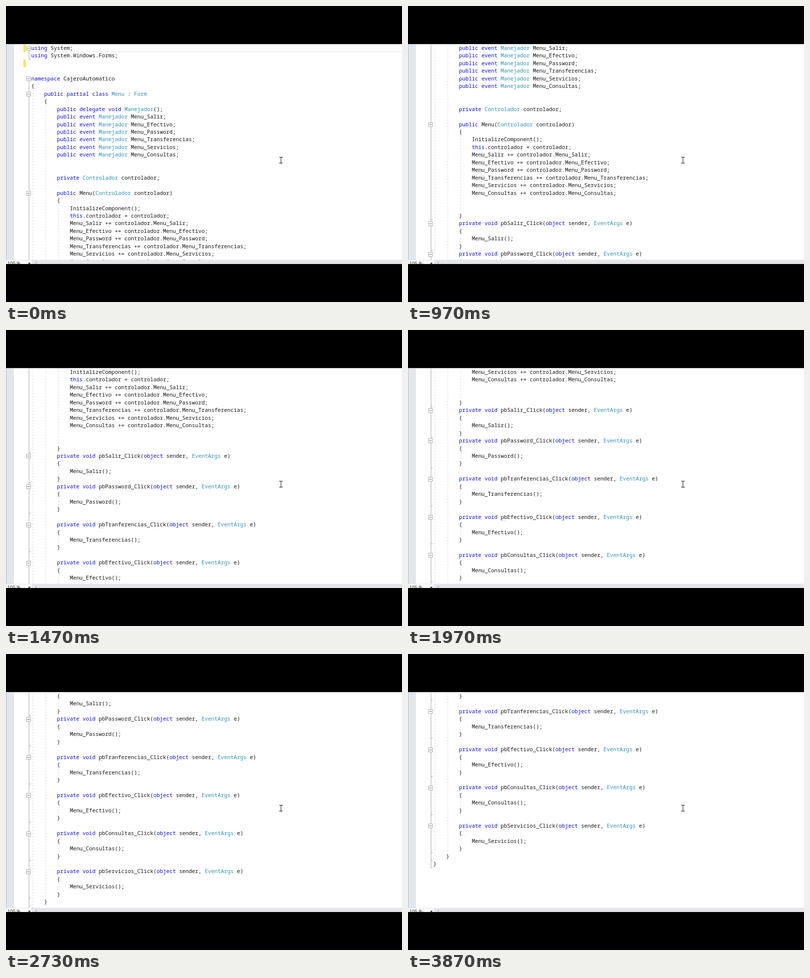
An HTML page with a canvas that plays this animation: 800 px wide and 600 px high, repeating every 3.91 s.

```html
<!DOCTYPE html>
<html lang="es">
<head>
<meta charset="utf-8">
<style>
html, body { margin: 0; width: 100%; height: 100%; overflow: hidden; background: #000; }
canvas { display: block; }
</style>
</head>
<body>
<canvas id="stage" width="800" height="600"></canvas>
<script>
const ctx = document.getElementById('stage').getContext('2d');
const LOOP = 3910, PITCH = 15.46, CHAR = 6.492, LEFT = 51, TOP = 78, BOTTOM = 515;
// Each wheel click moves the text up by three lines.
const CLICKS = [770, 870, 930, 1030, 1370, 1430, 1470, 1500, 1970, 2330, 2730, 3070, 3370];

const options = ['Salir', 'Efectivo', 'Password', 'Transferencias', 'Servicios', 'Consultas'];
const handler = (button, event = button) => [
  `        private void pb${button}_Click(object sender, EventArgs e)`,
  '        {',
  `            Menu_${event}();`,
  '        }'
];
const lines = [
  'using System;',
  'using System.Windows.Forms;',
  '', '',
  'namespace CajeroAutomatico',
  '{',
  '    public partial class Menu : Form',
  '    {',
  '        public delegate void Manejador();',
  ...options.map(o => `        public event Manejador Menu_${o};`),
  '', '',
  '        private Controlador controlador;',
  '',
  '        public Menu(Controlador controlador)',
  '        {',
  '            InitializeComponent();',
  '            this.controlador = controlador;',
  ...options.map(o => `            Menu_${o} += controlador.Menu_${o};`),
  '', '',
  '        }',
  ...handler('Salir'),
  ...handler('Password'), '',
  ...handler('Tranferencias', 'Transferencias'), '',
  ...handler('Efectivo'), '',
  ...handler('Consultas'), '',
  ...handler('Servicios'),
  '    }',
  '}'
];

const TOKENS = /\b(using|namespace|public|partial|class|delegate|void|event|private|this|object)\b|\b(Manejador|Controlador|EventArgs|Form|Menu(?= :))\b|[^\s\w]+|\w+/g;
const tokens = lines.map(line => [...line.matchAll(TOKENS)].map(m => ({
  text: m[0], col: m.index, color: m[1] ? '#0c0ce6' : m[2] ? '#2b91af' : '#161616'
})));

// Foldable blocks: [first line, last line, indent column]
const folds = [[0, 1, -1]];
const open = [];
lines.forEach((line, i) => {
  const mark = line.trim();
  if (mark === '{') open.push(i - 1);
  if (mark === '}') folds.push([open.pop(), i, line.indexOf('}')]);
});

function rect(color, x, y, w, h) {
  ctx.fillStyle = color;
  ctx.fillRect(x, y, w, h);
}

function drawGuide(x, y1, y2) {
  ctx.beginPath();
  ctx.moveTo(x, y1);
  ctx.lineTo(x, y2);
  ctx.stroke();
}

function drawFolds(mid) {
  const gray = '#a8a8a8';
  ctx.strokeStyle = '#d6d6d6';
  ctx.lineWidth = 1;
  ctx.setLineDash([3, 3]);
  for (const [first, last, col] of folds) {
    if (col >= 0) drawGuide(Math.floor(LEFT + (col + .5) * CHAR) + .5, mid(first + 1.5), mid(last - .5));
  }
  ctx.setLineDash([]);
  for (const [first, last] of folds) {
    const end = Math.round(mid(last + .5));
    rect(gray, 46, mid(first), 1, end - mid(first));
    rect(gray, 46, end, 4, 1);
  }
  for (const [first] of folds) {
    const y = Math.round(mid(first)) - 4;
    rect('#fff', 41, y, 9, 9);
    ctx.strokeStyle = gray;
    ctx.strokeRect(41.5, y + .5, 8, 8);
    rect('#686868', 43, y + 4, 5, 1);
  }
}

function drawCode(scroll) {
  const mid = line => 85.3 + (line - scroll) * PITCH;
  ctx.save();
  ctx.beginPath();
  ctx.rect(0, TOP, 800, BOTTOM - TOP);
  ctx.clip();

  rect('#e0e0e6', LEFT, mid(0) + 7, 749, 1);
  for (const line of [0, 2]) rect('#f3e85c', 35, mid(line) - 7.5, 5, PITCH);
  drawFolds(mid);

  ctx.font = '10.82px "Noto Sans Mono", monospace';
  tokens.forEach((row, i) => {
    const base = Math.round(mid(i) + 3.6);
    if (base < 70 || base > 530) return;
    for (const { text, col, color } of row) {
      const x = LEFT + col * CHAR;
      ctx.fillStyle = color;
      ctx.fillText(text, x, base);
      if (/^pb/.test(text)) for (const dx of [2, 5, 8]) rect('#8a8a8a', Math.round(x) + dx, base + 3, 1, 1);
    }
  });
  ctx.restore();
}

function drawFrame() {
  rect('#c0c2c8', 0, 77, 800, 1);
  rect('#e3e6ec', 0, TOP, 16, BOTTOM - TOP);
  rect('#b9bbc1', 0, TOP, 1, BOTTOM - TOP);
}

function triangle(color, ...p) {
  ctx.fillStyle = color;
  ctx.beginPath();
  ctx.moveTo(p[0], p[1]);
  ctx.lineTo(p[2], p[3]);
  ctx.lineTo(p[4], p[5]);
  ctx.fill();
}

function drawBar() {
  rect('#e5e6ea', 0, 514.5, 800, 8.5);
  rect('#fbfbfc', 1, 515.5, 51, 7.5);
  ctx.save();
  ctx.beginPath();
  ctx.rect(0, 514, 800, 9);
  ctx.clip();
  ctx.font = '9.6px "Open Sans", sans-serif';
  ctx.fillStyle = '#1e1e1e';
  ctx.fillText('105 %', 2.5, 524.5);
  triangle('#1e1e1e', 44.5, 520.5, 50, 520.5, 47.25, 523.5);
  triangle('#c6c8ce', 58, 520.5, 62, 517, 62, 524);
  ctx.restore();
}

function drawPointer() {
  const ink = '#111';
  rect(ink, 555, 306, 1, 13);
  for (const y of [306, 318]) {
    rect(ink, 552, y, 3, 1);
    rect(ink, 556, y, 3, 1);
  }
}

function draw(now) {
  const t = now % LOOP;
  const scroll = 3 * CLICKS.filter(c => c <= t).length;
  rect('#000', 0, 0, 800, 600);
  rect('#fff', 0, 77, 800, 446);
  drawFrame();
  drawCode(scroll);
  drawBar();
  drawPointer();
}

const start = performance.now();
function tick() {
  draw(performance.now() - start);
  requestAnimationFrame(tick);
}
tick();
</script>
</body>
</html>
```
